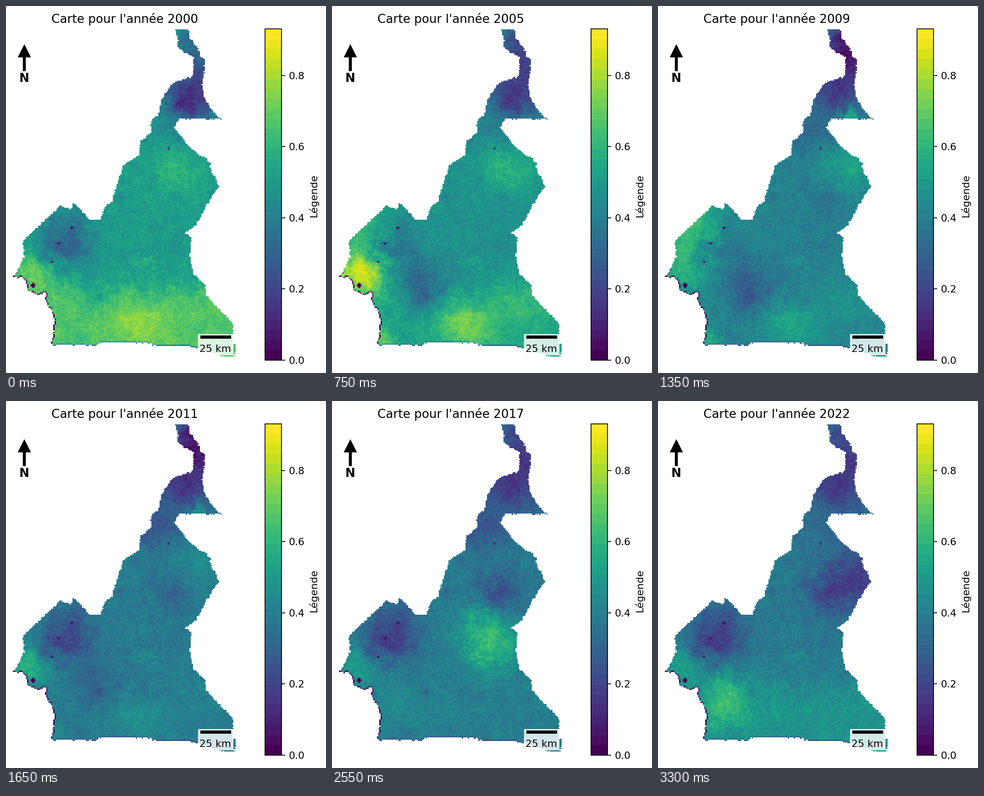
These frames come from a looping animation (698 px wide and 802 px high, 3450 ms). A matplotlib script:

```python
import numpy as np
import matplotlib.pyplot as plt
from matplotlib.animation import FuncAnimation
from matplotlib.patches import Polygon, Rectangle
from matplotlib.path import Path

W, H, DPI = 698, 802, 64
PT = 72 / DPI                      # points per pixel
EM = 21.875                        # body text size in pixels
CELL, X0, Y0, COLS, ROWS = 2.6, 15, 51.5, 188, 276
VMAX = 0.931
FIRST_YEAR, YEARS = 2000, 23
ALWAYS = np.inf
plt.rcParams["font.family"] = "DejaVu Sans"

# Key corners of the border, clockwise from the northern tip
BORDER = [
    (370, 52), (397, 52), (402, 71), (420, 94), (424, 111), (433, 116), (429, 180),
    (437, 209), (459, 238), (470, 248), (376, 247), (367, 267), (389, 296), (420, 325),
    (438, 333), (449, 362), (464, 394), (437, 436), (413, 480), (391, 496), (404, 506),
    (401, 541), (409, 586), (432, 606), (436, 631), (497, 696), (497, 738), (503, 740),
    (498, 767), (480, 766), (400, 743), (320, 742), (318, 737), (203, 735), (196, 742),
    (103, 742), (99, 736), (107, 690), (102, 668), (84, 640), (91, 626), (72, 631),
    (48, 621), (40, 594), (15, 593), (24, 582), (37, 550), (38, 512), (97, 457),
    (121, 436), (141, 445), (148, 432), (182, 467), (205, 467), (218, 436), (230, 430),
    (255, 348), (290, 324), (294, 295), (316, 276), (317, 247), (331, 240), (336, 210),
    (364, 168), (408, 154), (408, 112), (378, 94), (370, 58)]

# Regional swings: x, y, radius, peak year, span in years, change at the peak
SWINGS = [
    (405, 150, 100, 0, ALWAYS, -.23),      # dry north
    (135, 515, 55, 0, ALWAYS, -.22),       # highlands
    (45, 575, 40, 0, ALWAYS, .12),         # western coast
    (410, 215, 55, 1, 5, -.22),
    (405, 95, 55, 9, 5, -.17),
    (425, 245, 22, 9, 3, .25),
    (325, 280, 50, 14, 5, -.15),
    (365, 360, 50, 3, 5, .12),
    (425, 345, 50, 8, 3, .13),
    (430, 385, 65, 22, 3, -.22),
    (365, 418, 45, 18, 8, -.16),
    (340, 518, 65, 17, 2.5, .27),
    (70, 585, 50, 3.5, 2.7, .33),
    (95, 495, 80, 7.3, 2.2, .54),
    (42, 575, 35, 13, 2, .22),
    (190, 620, 60, 6, 5, -.20),
    (110, 725, 35, 7, 3, .25),
    (295, 700, 50, 5, 6, .19),
    (400, 640, 60, 6, 4, .09),
    (150, 655, 50, 22, 4, .16)]

LAKES = [(59, 610, 5), (115, 519, 3), (101, 560, 2), (144, 485, 3), (355, 312, 2)]

rng = np.random.default_rng(7)
gx, gy = np.meshgrid(X0 + CELL * (np.arange(COLS) + 0.5),
                     Y0 + CELL * (np.arange(ROWS) + 0.5))


def fractal_noise(power):
    """Unit-variance noise whose spectrum falls off as 1/f**power."""
    fy, fx = np.fft.fftfreq(ROWS)[:, None], np.fft.fftfreq(COLS)[None, :]
    spectrum = np.fft.fft2(rng.normal(size=(ROWS, COLS)))
    noise = np.fft.ifft2(spectrum / (np.hypot(fx, fy) + 0.02) ** power).real
    return (noise - noise.mean()) / noise.std()


def bell(distance, width):
    return np.exp(-(distance / width) ** 2)


# Country mask with a slightly ragged edge
ragged = np.column_stack([(gx + 1.2 * fractal_noise(1.1)).ravel(),
                          (gy + 0.6 * fractal_noise(1.1)).ravel()])
inside = Path(BORDER).contains_points(ragged).reshape(ROWS, COLS)
padded = np.pad(inside, 1)
open_left, open_below = ~padded[1:-1, :-2], ~padded[2:, 1:-1]

# Sea and lake cells read zero, the southern edge is dimmed
water = inside & (open_left | open_below) & (gx < 109) & (gy > 582) & (gy < 738)
water &= rng.random(water.shape) < 0.8
for x, y, radius in LAKES:
    water |= np.hypot(gx - x, gy - y) < radius
south_edge = inside & open_below & (gx > 100) & (gx < 420) & (gy > 728)

# Terrain detail shared by all years
texture = 0.014 * fractal_noise(0.2) + 0.02 * fractal_noise(1.1)
patches = fractal_noise(0.9) > 0.2
texture += 0.07 * patches * bell(np.hypot(gx - 310, gy - 545), 42)
texture -= 0.09 * bell(np.hypot(gx - 206, gy - 633), 7)
texture -= 0.08 * bell(np.hypot(gx - 250, gy - 417), 9)

# Warped coordinates keep the regions from looking like perfect circles
warp_x, warp_y = gx + 8 * fractal_noise(1.5), gy + 8 * fractal_noise(1.5)
shapes = [bell(np.hypot(warp_x - x, warp_y - y), r) for x, y, r, *_ in SWINGS]
south = 1 / (1 + np.exp((612 - warp_y) / 14))


def field(year):
    decline = 0.5 + 0.5 * np.cos(np.pi * min(year / 13, 1))
    grid = 0.38 + 0.13 * decline + texture
    grid += south * (0.16 * bell(year, 6) + 0.10 * bell(year - 22, 4))
    for shape, (*_, peak, span, change) in zip(shapes, SWINGS):
        grid += change * bell(year - peak, span) * shape
    grid = np.clip(grid, 0.04, VMAX)
    grid[south_edge] *= 0.6
    grid[water] = 0
    return np.ma.masked_where(~inside, grid)


fig = plt.figure(figsize=(W / DPI, H / DPI), dpi=DPI, facecolor="white")
ax = fig.add_axes([0, 0, 1, 1])
ax.axis("off")

image = ax.imshow(field(0), cmap=plt.get_cmap("viridis", 33), vmin=0, vmax=VMAX,
                  extent=(X0, X0 + CELL * COLS, Y0 + CELL * ROWS, Y0),
                  interpolation="nearest", aspect="auto")
ax.set(xlim=(0, W), ylim=(H, 0))


def label(x, y, text, size=EM, **style):
    return ax.text(x, y, text, fontsize=size * PT, ha="center", **style)


title = label(259.2, 37, "", 1.2 * EM)

# North arrow
ax.add_patch(Polygon([(40, 84), (54, 112), (43, 112), (43, 142), (37, 142), (37, 112),
                      (26, 112)], facecolor="black", edgecolor="black", linewidth=0.6))
label(40, 166, "N", 1.2 * EM, weight="bold")

# Scale bar
ax.add_patch(Rectangle((420, 718), 74.5, 44, facecolor=(1, 1, 1, 0.8),
                       edgecolor=(1, 1, 1, 0.8), linewidth=2.2 * PT, zorder=3))
ax.add_patch(Rectangle((424, 720), 66.5, 7, facecolor="black", edgecolor="none", zorder=4))
label(457, 756, "25 km", zorder=4)

# Colour bar
cax = fig.add_axes([565 / W, 1 - 773.5 / H, 36.17 / W, 723.5 / H])
bar = fig.colorbar(image, cax=cax, ticks=[0, 0.2, 0.4, 0.6, 0.8])
bar.outline.set_linewidth(0.08 * EM * PT)
cax.tick_params(length=0.35 * EM * PT, width=0.08 * EM * PT, pad=0.35 * EM * PT,
                labelsize=EM * PT)
label(671, 414, "Légende", rotation=90, va="center")


def draw(frame):
    image.set_data(field(frame))
    title.set_text(f"Carte pour l'année {FIRST_YEAR + frame}")
    return image, title


animation = FuncAnimation(fig, draw, frames=YEARS, interval=150, repeat=True,
                          repeat_delay=0)
plt.show()
```
